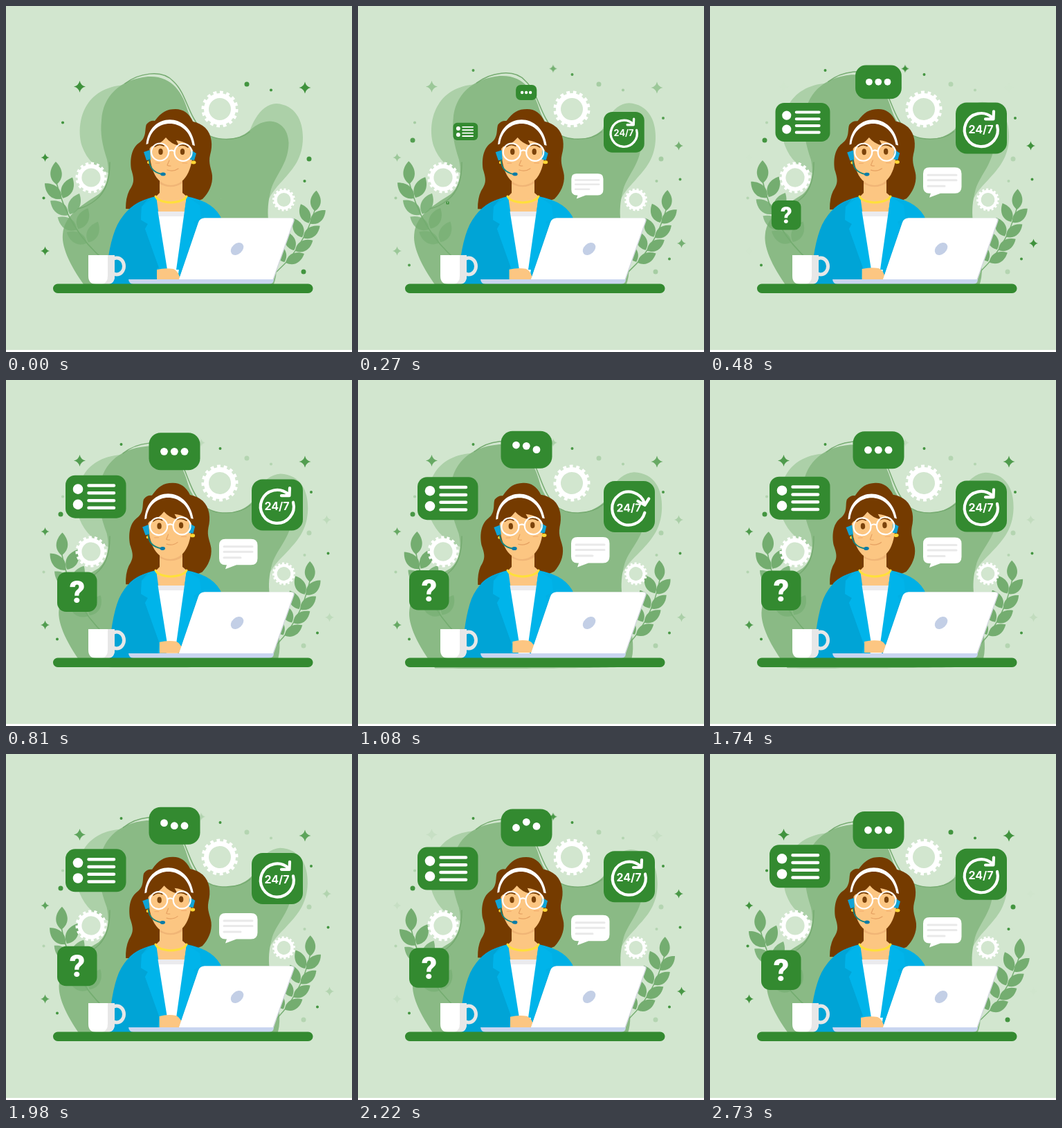
Recreate the animation shown at these times as an HTML page. Size 500 px wide and 500 px high, loop 2.76 s.

```html
<!DOCTYPE html>
<html lang="en">
<head>
<meta charset="utf-8">
<title>Online support</title>
<style>
  html, body { margin: 0; width: 100%; height: 100%; overflow: hidden; background: #d2e6cf; }
  svg { display: block; width: 100%; height: 100%; }
  text { font-family: Inter, Roboto, sans-serif; fill: #fff; text-anchor: middle; }
  .line { fill: none; stroke-linecap: round; stroke-linejoin: round; }
</style>
</head>
<body>
<svg id="stage" viewBox="0 0 500 500">
  <defs>
    <path id="star" d="M0 -1Q.18 -.18 1 0Q.18 .18 0 1Q-.18 .18 -1 0Q-.18 -.18 0 -1Z"/>
    <path id="leaf" d="M0 0C-12 -9 -10 -23 0 -33C10 -23 12 -9 0 0Z"/>
    <g id="gear" fill="none" stroke="#fff">
      <circle r="19.5" stroke-width="7"/>
      <circle r="24.3" stroke-width="4.4" pathLength="32" stroke-dasharray="1 1"/>
    </g>
  </defs>
  <rect width="500" height="500" fill="#d2e6cf"/>
  <rect y="497" width="500" height="3" fill="#fff"/>

  <g id="backdrop">
    <path fill="#acd0a8" d="M180 114C150 113 128 125 117 143C106 160 104 185 110 203C117 222 130 235 150 242L190 190Z"/>
    <path fill="#acd0a8" d="M345 205C352 175 365 142 391 141C418 143 429 165 429 190C429 220 415 235 400 252C388 265 382 272 376 288L350 250Z"/>
    <path fill="#8aba85" d="M118 410C95 380 80 350 82 330C84 300 115 285 134 272C148 260 150 240 146 222C139 200 136 185 138 165C140 130 165 106 205 102C240 100 255 125 263 152C270 172 285 186 300 190C320 195 335 192 348 183C360 173 368 167 381 166.5C398 167 408 180 408.5 198C408 228 390 243 383 265C374 300 380 320 388 350C393 375 392 395 384 408C340 412 160 412 118 410Z"/>
    <g class="line" stroke="#76ab71" stroke-width="1.5">
      <path d="M172 112C190 98 225 90 242 109C262 128 262 158 285 181C300 196 335 196 352 182"/>
      <path d="M150 226C150 255 142 270 130 280Q118 290 104 293"/>
    </g>
  </g>

  <g class="line" stroke="#439540">
    <g id="dotsA">
      <path stroke-width="7" d="M348 113h0M438 221h0M430 384h0"/>
      <path stroke-width="4.2" d="M383 121.5h0M431.5 253h0M54.5 277.5h0M82 168.5h0"/>
    </g>
    <g id="dotsB">
      <path stroke-width="7" d="M79 194h0"/>
      <path stroke-width="4" d="M166.5 93h0M441 162h0M450 365.5h0M465.5 250.5h0M309.5 99h0M74 374.5h0"/>
    </g>
  </g>
  <g fill="#3f923c">
    <g id="starsA">
      <use href="#star" transform="translate(106.5 116.5) scale(8.5)"/>
      <use href="#star" transform="translate(432 118) scale(8.5)"/>
      <use href="#star" transform="translate(56.5 219) scale(6)"/>
      <use href="#star" transform="translate(56.5 354) scale(6.5)"/>
    </g>
    <g id="starsB">
      <use href="#star" transform="translate(282 90.5) scale(5.7)"/>
      <use href="#star" transform="translate(463.5 202) scale(6.5)"/>
      <use href="#star" transform="translate(467.5 343) scale(6.5)"/>
    </g>
  </g>

  <g id="plantL" fill="#74ad70"></g>
  <g id="plantR" fill="#74ad70"></g>
  <g transform="translate(309 149)"><use href="#gear" class="spin"/></g>
  <g transform="translate(123 248) scale(.85)"><use href="#gear" class="spin"/></g>
  <g transform="translate(401.5 280) scale(.62)"><use href="#gear" class="spin"/></g>

  <path id="hair" fill="#753b00" d="M245 149C232 149 225 153 215 166Q208 165 203 171C200 178 204 190 192 198C181 206 179 222 181 236C186 252 185 256 178 267Q173 277 173 293L240 296L284 279C293 270 299 258 298 245C297 235 292 228 295 215C299 202 298 186 288 176Q280 169 270 167Q262 149 245 149Z"/>
  <path d="M222 240H255V270L262 276L260 300H218L216 276L222 270Z" fill="#fcc682"/>
  <path d="M222 250Q238 264 255 250V256Q239 266 222 257Z" fill="#f0b576"/>
  <path d="M217 275Q190 281 178 294L200 400H300L312 309Q302 283 261 275L247 380H232Z" fill="#00b0e5"/>
  <path id="sleeve" fill="#00a4d6"/>
  <path d="M218 297H260L248 396H232Z" fill="#fff"/>
  <path d="M218 297H260L259 304H219Z" fill="#ebebee"/>
  <path d="M216 275L196 290L195 309L205 315L201 322L222 381L233 381Z" fill="#00b4ea"/>
  <path d="M261 275L280 288L282 306L271 312L274 318L254 381L246 381Z" fill="#00b4ea"/>
  <path class="line" d="M216 275Q220 283 238 284Q257 283 261 275" stroke="#ffe03a" stroke-width="3"/>

  <g id="head">
    <path d="M208 192C205 232 215 258 238 259C262 258 271 232 271 195L240 178Z" fill="#fcc682"/>
    <path d="M202 212C202 172 220 165 239 165C263 165 273 182 271 211Q266 197 246 194L250 202Q238 199 231 190Q222 201 210 203Z" fill="#753b00"/>
    <path d="M202.500 200C207 152 267 152 273 202L269.500 201C263 160 211 160 205.500 199Z" fill="#fff"/>
    <path d="M199 211L208 208L209 222L203 223Z" fill="#10a4d6"/>
    <path d="M267 208L275 213L272 223L266 222Z" fill="#10a4d6"/>
    <g fill="#ffd633"><circle cx="206" cy="226" r="2"/><ellipse cx="271" cy="226" rx="3.500" ry="2.500"/></g>
    <path class="line" d="M207 222Q207 239 225 243" stroke="#15857f" stroke-width="1.800"/>
    <ellipse cx="227" cy="243" rx="3.800" ry="2.500" fill="#087ca8"/>
    <g class="line" stroke="#753b00" stroke-width="1.800"><path d="M215 203Q221 198 228 202"/><path d="M249 202Q257 199 263 204"/></g>
    <g fill="#7b430b" transform="translate(0 210.500)"><g id="eyes"><ellipse cx="223.500" rx="3.200" ry="4.500"/><ellipse cx="255" rx="3.200" ry="4.500"/></g></g>
    <g class="line" stroke="#fff" stroke-width="2.200"><circle cx="222.500" cy="211" r="12.500"/><circle cx="256" cy="211.500" r="12.500"/><path d="M235 210Q239 207 243.500 210"/></g>
    <g class="line" stroke="#e5a162" stroke-width="1.200"><path d="M236 223L233 230Q235 231.500 238 231"/><path d="M233 237Q242 240 249 235"/><path d="M216 227H222M255 227H262" stroke="#f2ac6d"/></g>
  </g>

  <path id="hand" d="M218 381Q230 378 242 380Q250 383 252 397H218Z" fill="#fcc682"/>
  <path d="M177 395H387Q387 402 380 402H184Q178 402 177 395Z" fill="#c9d5f0"/>
  <path d="M287 306.500H413Q418 306.500 416.500 311L387 395H250L278 313Q280 306.500 287 306.500Z" fill="#d3d8de"/>
  <path d="M287 306.500H411.500Q416.500 306.500 415 311L385.500 395H250L278 313Q280 306.500 287 306.500Z" fill="#fff"/>
  <ellipse cx="334" cy="351" rx="10.500" ry="7.500" transform="rotate(-42 334 351)" fill="#c3cfe6"/>
  <ellipse cx="160" cy="376" rx="10.500" ry="12" fill="none" stroke="#e7e7e7" stroke-width="5"/>
  <path d="M119 360H157V390Q157 402 146 402H130Q119 402 119 390Z" fill="#fff"/>
  <path d="M147 360H157V390Q157 402 146 402H139Q147 400 147 390Z" fill="#e7e7e7"/>
  <rect x="68" y="401.500" width="375.500" height="13.500" rx="6.750" fill="#338a30"/>

  <g id="chat">
    <path d="M317 236H354Q363.500 236 363.500 245V264Q363.500 273.500 354 273.500H333L317 279.500L319 273.500H317Q308 273.500 308 264V245Q308 236 317 236Z" fill="#fff"/>
    <path class="line" d="M315 247H356M315 254.500H356M315 263H339" stroke="#e9e9e9" stroke-width="3"/>
  </g>
  <g id="typing">
    <rect x="206.500" y="83" width="74" height="54" rx="17" fill="#338a30"/>
    <g id="bounce" fill="#fff"><circle cx="228.500" r="5.400"/><circle cx="243.300" r="5.400"/><circle cx="258" r="5.400"/></g>
  </g>
  <g id="list">
    <rect x="86" y="131.300" width="87.500" height="62" rx="14" fill="#338a30"/>
    <g fill="#fff"><circle cx="104" cy="151.300" r="7.300"/><circle cx="104" cy="173.500" r="7.300"/></g>
    <path class="line" d="M119.500 146.200H156M119.500 157H156M119.500 167.800H156M119.500 178.500H156" stroke="#fff" stroke-width="4.500"/>
  </g>
  <g id="clock">
    <rect x="355" y="136.700" width="74" height="74" rx="16" fill="#338a30"/>
    <g id="arrow" class="line" stroke="#fff" stroke-width="4.200"><path d="M23.500 -5A24 24 0 1 1 16.500 -16.500M18.500 -25.500L18 -14.500L6.500 -14.500"/></g>
    <text id="hours" x="391.500" y="181" font-size="16" font-weight="700">24/7</text>
  </g>
  <g id="ask">
    <rect x="74" y="283.500" width="57.500" height="57.500" rx="13" fill="#338a30"/>
    <text x="103" y="328" font-size="44" font-weight="900" style="font-family: Roboto, sans-serif">?</text>
  </g>
</svg>
<script>
const LOOP = 2760;
const $ = id => document.getElementById(id);
const set = (id, name, value) => $(id).setAttribute(name, value);
const clamp = v => Math.max(0, Math.min(1, v));
const wave = turns => (1 - Math.cos(turns * 2 * Math.PI)) / 2;
const smooth = v => wave(clamp(v) / 2);
const easeOut = v => 1 - (1 - clamp(v)) ** 2;

// Leaves grow in pairs down a bent stem rooted at 0,0.
function plant(fade) {
  const leaf = (x, y, angle, opacity) =>
    `<use href="#leaf" transform="translate(${x} ${y}) rotate(${angle})" opacity="${opacity}"/>`;
  let out = '<path class="line" d="M0 0Q-53 -43 -71 -116" stroke="#74ad70" stroke-width="1.6"/>' + leaf(-70, -110, -2, 1);
  for (let i = 0; i < 4; i++) {
    const u = 0.81 - 0.18 * i;
    const x = -106 * u * (1 - u) - 71 * u * u;
    const y = -86 * u * (1 - u) - 116 * u * u;
    out += leaf(x, y, -47 - 5 * i, 1 - fade * i) + leaf(x + 2, y - 1, 25, 1 - fade * i);
  }
  return out;
}

$('plantL').innerHTML = plant(0.13);
$('plantR').innerHTML = plant(0);
const backdrop = [...$('backdrop').querySelectorAll('path')].map(el => [el, el.getAttribute('d')]);
const spinners = document.querySelectorAll('.spin');

// Points far from the middle swell outwards, near ones stay put.
function swell(d, p) {
  return d.replace(/([\d.]+) ([\d.]+)/g, (_, px, py) => {
    const [x, y] = [px - 250, py - 280];
    const r = Math.hypot(x, y);
    const k = 1 + 0.15 * p * Math.max(0, r - 115) / r;
    return `${(250 + x * k).toFixed(2)} ${(280 + y * k).toFixed(2)}`;
  });
}

function pop(id, t, start, x, y, dy) {
  const k = easeOut((t - start) / 460);
  set(id, 'transform', `translate(${x} ${y + dy}) scale(${k}) translate(${-x} ${-y})`);
}

function hop(t, i) {
  const since = t - 895 - 130 * i;
  const u = (since < 1045 ? since : since - 1045) / 260;
  return u > 0 && u < 1 ? 8.5 * Math.sin(Math.PI * u) : 0;
}

function draw(t) {
  const p = wave(t / LOOP);
  for (const [el, d] of backdrop) el.setAttribute('d', swell(d, p));

  set('plantL', 'transform', `translate(143 368) rotate(${6 * p})`);
  set('plantR', 'transform', `translate(380 393) rotate(${2 - 6.5 * p}) scale(-.9 .9)`);
  for (const el of spinners) el.setAttribute('transform', `rotate(${180 * smooth(t / LOOP)})`);

  const flip = wave(3 * t / LOOP);
  set('starsA', 'opacity', 1 - flip);
  set('starsB', 'opacity', flip);
  const half = t % (LOOP / 2);
  const swap = smooth((Math.min(half, LOOP / 2 - half) - 40) / 300);
  set('dotsA', 'opacity', 1 - 0.8 * swap);
  set('dotsB', 'opacity', swap);

  const e = 7 * p;
  set('sleeve', 'd', `M205 279Q177 286 ${161 + e * .5} 316Q${147 + e} 345 ${144 + e} 402H218L${218 + e} ${380 - 3 * p}L221 378L201 322L205 315L195 309L196 290Z`);
  set('hand', 'transform', `translate(${6 * p} ${-3.5 * p})`);
  set('hair', 'transform', `rotate(${-3 * p} 238 290)`);
  set('head', 'transform', `rotate(${-3.2 * p} 238 265)`);
  set('eyes', 'transform', `scale(1 ${Math.max(0.14, clamp(Math.abs(t - 1380) / 100))})`);

  pop('chat', t, 0, 310, 279, -10 * p);
  pop('clock', t, 20, 355, 210.5, 10.5 * p);
  pop('typing', t, 165, 243, 137, -10.5 * p);
  pop('list', t, 165, 173, 193, 10 * p);
  pop('ask', t, 255, 131.5, 283.5, -9.5 * p);

  [...$('bounce').children].forEach((dot, i) => dot.setAttribute('cy', 110 - hop(t, i)));
  const spin = smooth((t - 930) / 810);
  set('arrow', 'transform', `translate(391.5 175) rotate(${360 * spin})`);
  set('hours', 'transform', `rotate(${-7 * wave(spin)} 391.5 175)`);
}

const begin = performance.now();
(function tick() {
  draw((performance.now() - begin) % LOOP);
  requestAnimationFrame(tick);
})();
</script>
</body>
</html>
```
